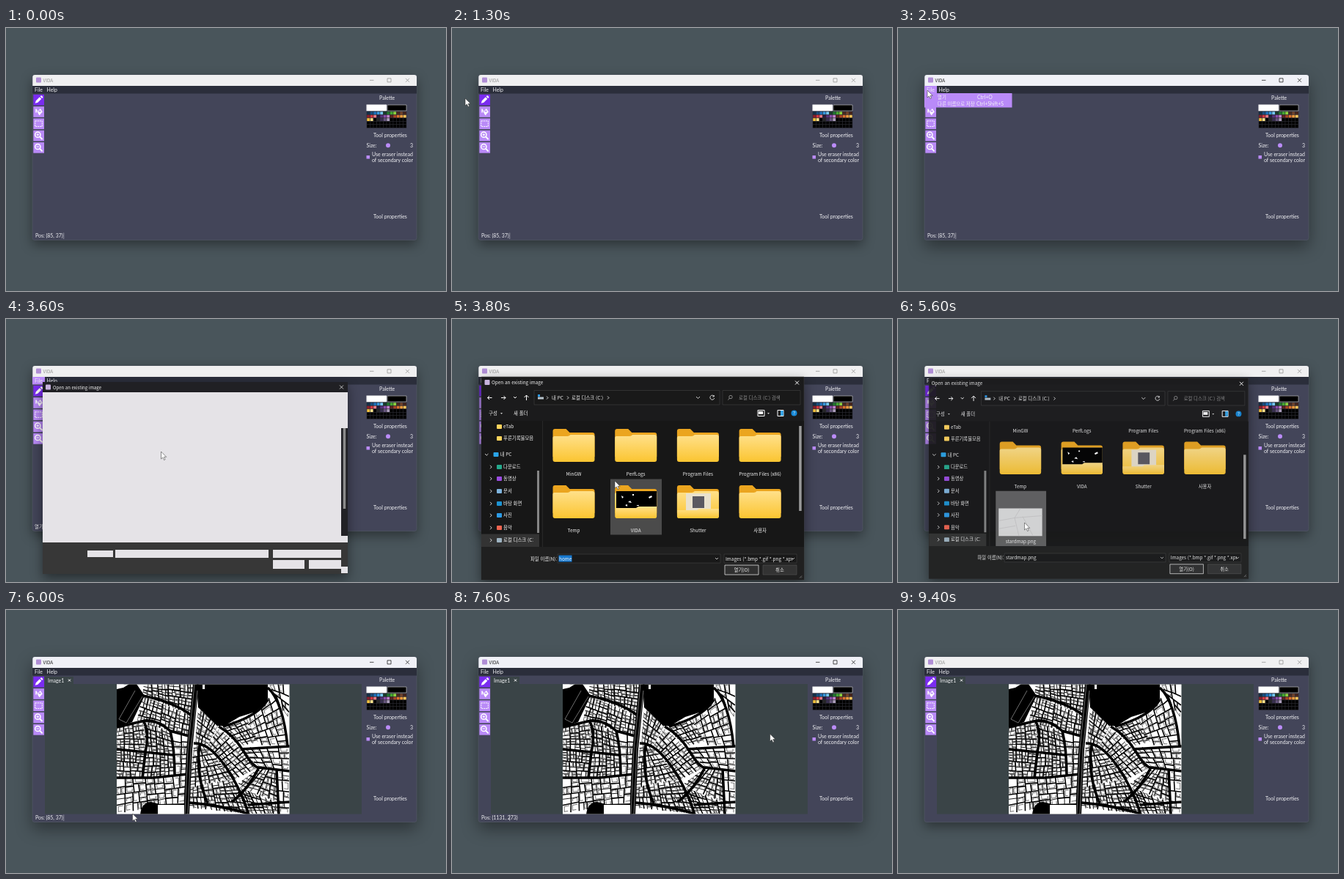
These frames come from a looping animation (600x359 px, 9500 ms). An HTML page:

```html
<!DOCTYPE html>
<html lang="ko">
<head>
<meta charset="utf-8">
<title>Opening an image</title>
<style>
html, body { margin: 0; width: 100%; height: 100%; overflow: hidden; background: #49555b; }
svg { display: block; width: 100%; height: 100%; }
text { white-space: pre; }
.app { font: 6.95px Lato, sans-serif; fill: #f2f2f5; }
.ui { font: 6.4px "Noto Sans CJK KR", "Noto Sans CJK JP", "Noto Sans CJK", sans-serif; fill: #f4f4f4; }
.mid { text-anchor: middle; }
.end { text-anchor: end; }
.line { fill: none; stroke: #fff; }
.dim { fill: none; stroke: #888; }
.frame { fill: #191919; stroke: #424242; stroke-width: .6; }
#dialog, #blank { transform-origin: 259px 217px; }
#dialog, #blank { filter: drop-shadow(0 6px 8px #0007); }
</style>
</head>
<body>
<svg viewBox="0 0 600 359">
  <defs>
    <linearGradient id="gold" x2="0" y2="1"><stop stop-color="#ffe08a"/><stop offset="1" stop-color="#fbc531"/></linearGradient>
    <clipPath id="mapClip"><path d="M151 101.5H386.5V278.5H151z"/></clipPath>
    <clipPath id="listClip"><path d="M124 139H472V311H124z"/></clipPath>
    <clipPath id="sideClip"><path d="M40 139H115V311H40z"/></clipPath>
    <g id="folder">
      <path d="M0 4q0-3 3-3h15l5 5h31q3 0 3 3v30H0z" fill="#eba51f"/>
      <path d="M0 13q0-2 2-2h18q2 0 4-2h30q3 0 3 3v31q0 3-3 3H3q-3 0-3-3z" fill="url(#gold)"/>
    </g>
  </defs>

  <rect width="600" height="359" fill="#49555b"/>
  <rect id="shadow" x="36" y="64" width="524" height="225.5" rx="3" fill="#434559" stroke="#565b68" stroke-width=".6"/>
  <g id="appWindow">
    <path id="titleBar" d="M36.300 79V67q0-3 3-3H557q3 0 3 3V79z"/>
    <g id="titleMarks">
      <rect x="41" y="67.5" width="7" height="7" rx="1" fill="#b08ed6"/>
      <text class="ui" x="50.5" y="73.5" style="fill:inherit">VIDA</text>
      <path d="M496 71.3h5.5M520 68.8h5v5h-5zM545 68.8l5 5m0-5l-5 5" fill="none" stroke="currentColor" stroke-width=".8"/>
    </g>
    <path d="M36 79H560V89.5H36z" fill="#2b2e3b"/>
    <rect id="fileHot" x="36" y="79" width="17" height="10.5" fill="#bb8cfa"/>
    <g class="app"><text x="39" y="87">File</text><text x="55.5" y="87">Help</text></g>
    <g id="tools"></g>

    <g class="app">
      <text class="mid" x="519.7" y="97.7">Palette</text>
      <text class="mid" x="524" y="149">Tool properties</text>
      <text x="491.5" y="162.7">Size:</text><text x="551" y="162.7">3</text>
      <text x="499" y="174.7">Use eraser instead</text>
      <text x="499" y="183">of secondary color</text>
      <text class="mid" x="524" y="260">Tool properties</text>
    </g>
    <g id="palette"></g>
    <circle cx="521" cy="160.3" r="3" fill="#bb8cfa"/>
    <rect x="491.5" y="174" width="4.5" height="4.5" fill="#bb8cfa"/>

    <g id="document">
      <path d="M53 91H92V101H485V278.5H53z" fill="#3a4447"/>
      <text class="app" x="57" y="99.2">Image1</text>
      <path d="M85 94.5l3 3m0-3l-3 3" class="line"/>
      <g id="map" clip-path="url(#mapClip)"></g>
    </g>
    <g class="app">
      <g id="pos"><text id="posText" x="40" y="286.2"></text><path d="M78.7 279.5v8.5" stroke="#c8c8d2" stroke-width=".6"/></g>
      <text id="hint" class="ui" x="39" y="286">열기</text>
    </g>
    <g id="menu">
      <path d="M36 89H155.5V108.5H36z" fill="#b98af8"/>
      <g class="ui"><text x="54" y="96.7">열기</text><text x="54" y="106.3">다른 이름으로 저장</text></g>
      <g class="app"><text x="108" y="96.8">Ctrl+O</text><text x="107" y="106.4">Ctrl+Shift+S</text></g>
    </g>
  </g>

  <g id="blank">
    <path d="M50 86H466V348H50z" fill="#373737"/>
    <path d="M50 86H466V100H50z" fill="#202024"/>
    <rect x="54" y="89.5" width="7" height="7" rx="1" fill="#c7b2dd"/>
    <text class="ui" x="64" y="95.5" style="font-size:6px">Open an existing image</text>
    <path d="M455 90.5l5 5m0-5l-5 5" class="line" stroke-width=".7"/>
    <path d="M50 100H466V149H457V296H466V305H50zM111 316h35v9h-35zM149 315h209v11H149zM364 315h93v11h-93zM364 329h43v12h-43zM413 329h44v9h9v9h-9v-6h-44z" fill="#e5e3e7"/>
    <path d="M457 149h9v147h-9z" fill="#222226"/><path d="M459.7 149h3.5v110h-3.5z" fill="#8b8b8b"/>
  </g>

  <g id="dialog">
    <path d="M40 79H480V356H40z" fill="#1b1b1c" stroke="#3a3a3c" stroke-width=".6"/>
    <path d="M40 139H480V311H40z" fill="#171717"/>
    <path d="M40 311H480V356H40z" fill="#202020"/>
    <rect id="dialogIcon" x="44.5" y="83" width="7" height="7" rx="1" fill="#c7b2dd"/>
    <text id="dialogTitle" class="ui" y="89.2">Open an existing image</text>
    <path d="M468 84.5l5 5m0-5l-5 5M54.5 107.5h-6m2.5-2.5l-2.5 2.5 2.5 2.5M101.5 111v-7m-3 3l3-3 3 3" class="line"/>
    <path d="M67 107.5h6m-2.5-2.5l2.5 2.5-2.5 2.5M84 106l2 2 2-2" class="line"/>
    <path class="frame" d="M112 97.5H365V117H112zM369 97.5H475V117H369z"/>
    <path d="M117 106.5h8v3h-8z" fill="#b8c4cc"/><path d="M117 103h3v3h-3z" fill="#2997e8"/>
    <path d="M129 105.5l2 2-2 2M157 105.5l2 2-2 2M212 105.5l2 2-2 2M333 106l2.5 2.5 2.5-2.5M357 105a3 3 0 1 0 .8 3m-.5-4v2h-2" class="line" stroke-width=".8"/>
    <circle cx="380" cy="106.5" r="2.2" class="dim"/><path d="M378.5 108l-2 2.5" class="dim"/>
    <g class="ui">
      <text x="136" y="109.7">내 PC</text><text x="163" y="109.7">로컬 디스크 (C:)</text>
      <text x="391" y="109.7" style="fill:#8f8f8f">로컬 디스크 (C:) 검색</text>
      <text x="50" y="131.3">구성</text><text x="84" y="131.3">새 폴더</text>
      <text class="end" x="143" y="329.5">파일 이름(N):</text>
    </g>
    <path d="M66 128h3l-1.5 2zM430 128h3l-1.5 2z" fill="#ccc"/>
    <path d="M417 124.5h9v8h-9zM444 124.5h8v8h-8z" class="line"/><path d="M418 126h6v4h-6z" fill="#fff"/><path d="M448 125h4v7h-4z" fill="#38a5e8"/>
    <circle cx="466.5" cy="128.5" r="4" fill="#1689d8"/><text class="ui mid" x="466.5" y="130.7">?</text>
    <path d="M40 293.5H119V311H40z" fill="#333"/>
    <g id="side" class="ui" clip-path="url(#sideClip)"></g>
    <path d="M116 207h3v85h-3z" fill="#858585"/><path d="M123.5 139V311" stroke="#303030" stroke-width=".7"/>
    <g clip-path="url(#listClip)"><g id="files" class="ui">
      <path id="hover" d="M216 218.5h70v76h-70z" fill="#4b4b4b"/>
      <path id="selected" d="M132 295h69.5v76H132z" fill="#626262"/>
    </g></g>
    <path id="thumb" d="M473.2 146h3.5v116h-3.5z" fill="#9a9a9a"/>
    <path class="frame" d="M144 321H366V333H144zM371 321H470V333H371z"/>
    <path id="marked" d="M145.5 322.5h18v9h-18z" fill="#1879cf"/>
    <text id="fileName" class="ui" x="146" y="329.5"></text>
    <text class="ui" x="373" y="329.5">Images (*.bmp *.gif *.png *.xpı</text>
    <path d="M359 326l2 2 2-2M463 326l2 2 2-2" class="line" stroke-width=".7"/>
    <path d="M372 336h46v13h-46z" fill="#303030" stroke="#ddd" stroke-width=".8"/><path d="M424 336h46v13h-46z" fill="#333" stroke="#555" stroke-width=".6"/>
    <g class="ui mid"><text x="395" y="344.8">열기(O)</text><text x="447" y="344.8">취소</text></g>
    <path d="M474 353.5l3-3m-1 3l1-1" class="dim" stroke-width=".8"/>
  </g>

  <path id="cursor" d="M0 0V10l2.3-2.1L4 11.5l1.6-.8L4 7.3h3.2z" fill="#fff" stroke="#222" stroke-width=".5"/>
</svg>
<script>
const LOOP = 9500, STEP = 100;
const $ = id => document.getElementById(id);
const add = (id, markup) => $(id).insertAdjacentHTML('beforeend', markup);

function drawTools() {
  const lens = '<circle cx="6" cy="6" r="3.6" class="line" stroke-width="1.5"/><path d="M8.7 8.7l3.6 3.6" class="line" stroke-width="1.8"/>';
  const icons = [
    '<path d="M2.5 12l1-3.5 5-5 2.500 2.500-5 5zM9.300 2.800l1-1q.7-.5 1.300 0l1.200 1.200q.5.600 0 1.300l-1 1z" fill="#fff"/>',
    '<path d="M3 3.500h1.500v5H3zM5.500 7.500l4-4.500 3 4.500-4.500 4.500z" fill="#fff"/><path d="M6.500 7.500l2.500-2.700 1.800 2.700z" fill="#b98af7"/><path d="M4 4l5 8" class="line"/>',
    '<path d="M2.500 3.500h9.500v7.500H2.500z" class="line" stroke-dasharray="2 1"/>',
    lens + '<path d="M4.300 6h3.400M6 4.300v3.400" class="line"/>',
    lens + '<path d="M4.300 6h3.400" class="line"/>'
  ];
  icons.forEach((icon, i) => add('tools', `<g transform="translate(37.3 ${90.8 + i * 16.3})">
    <rect width="14.7" height="14.7" fill="${i ? '#b98af7' : '#7a2cf0'}"/>${icon}</g>`));
}

function drawPalette() {
  const rows = [
    '#12304a #174f80 #1d6fb8 #3596dc #74c6f0 #173d2b #20762f #43a832 #8bd13e #4a2a20 #70432c #45251d',
    '#8b1c2c #d5353f #ed7b86 #281b3c #56307b #8a4bab #c080cc #5c2420 #a74424 #de722d #f29a3c #ffc55c',
    '#f2bf3c #ffe28a #000 #262626 #393050 #66557e #ab9dbb'
  ];
  let cells = '';
  for (let r = 0; r < 5; r++) for (let c = 0; c < 12; c++) {
    const fill = (rows[r] || '').split(' ')[c] || '#000';
    cells += `<rect x="${492 + c * 4.5}" y="${114 + r * 4.45}" width="4.5" height="4.45" fill="${fill}"/>`;
  }
  add('palette', `<path d="M491.5 104.5h27.5v8.8h-27.5z" fill="#fff"/>
    <path d="M520 105h26v8h-26z" stroke="#bbb" stroke-width=".7"/>
    <g stroke="#2b2b30" stroke-width=".5">${cells}</g>`);
}

function drawMap() {
  let seed = 41;
  const random = () => (seed = seed * 16807 % 2147483647) / 2147483647;
  const mix = (a, b, k) => [a[0] + (b[0] - a[0]) * k, a[1] + (b[1] - a[1]) * k];
  const gap = (a, b) => Math.hypot(a[0] - b[0], a[1] - b[1]);
  const path = (...points) => 'M' + points.map(p => p.map(v => v.toFixed(1)).join(' ')).join('L');
  let streets = '', fences = '', houses = '';

  // Cuts a district across its longer side, slightly askew, until only building plots remain.
  function split([a, b, c, d], limit) {
    let w = (gap(a, b) + gap(c, d)) / 2, h = (gap(b, c) + gap(a, d)) / 2;
    if (w < h) [a, b, c, d, w, h] = [b, c, d, a, h, w];
    const area = w * h;
    if (area < limit * (.6 + random() * .8)) {
      const inner = (u, v) => mix(mix(a, b, u), mix(d, c, u), v);
      const u = .12 + random() * .15, v = .75 + random() * .12;
      if (random() < .7) houses += path(inner(u, .2), inner(u, v), inner(.8, v), inner(.8, .35));
      return;
    }
    const k = .4 + random() * .2, m = k + (random() - .5) * .12;
    const p = mix(a, b, k), q = mix(d, c, m);
    if (area > 180) streets += path(p, q);
    else fences += path(p, q);
    split([a, p, q, d], limit);
    split([p, b, c, q], limit);
  }
  const districts = (limit, list) => list.split('\n').forEach(row =>
    split(row.trim().split(' ').map(p => p.split(',').map(Number)), limit));

  districts(44, `188,101 257,101 253,144 186,116
    186,117 253,144 252,173 178,152
    151,160 188,152 190,194 151,190
    188,152 224,166 228,198 190,194
    151,190 190,194 186,229 151,229
    190,194 228,198 230,226 186,229`);
  districts(48, `262,133 290,158 274,186 258,181
    290,159 326,147 345,180 318,186
    274,186 290,160 345,215 310,232
    256,184 272,185 310,230 250,243
    250,242 310,230 330,278 250,270
    345,216 370,219 372,263 312,240
    312,240 372,263 372,278 330,278`);
  districts(130, `151,230 247,225 245,262 151,278
    227,168 252,173 247,224 231,226
    326,147 368,112 384,186 342,184
    318,188 386,186 386,219 345,215
    370,219 386,220 386,278 372,278
    358,101 386,101 386,150 370,125`);

  add('map', `<path d="M151 101H387V279H151z" fill="#fff"/>
    <g fill="none" stroke="#000">
      <path d="${houses}" stroke-width=".55"/>
      <path d="${fences}" stroke-width=".9"/>
      <path d="${streets}" stroke-width="1.6"/>
      <path stroke-width="3.6" d="M151 160L185 152Q203 147 224 165L253 173M187 117Q230 126 253 144M151 190L228 198
        M188 152Q196 170 190 194L186 229M224 165Q230 190 230 226M151 229H200L248 224
        M256 182Q274 181 293 205T325 262L331 279M290 159Q310 170 324 193T345 215L387 220
        M296 159Q345 145 357 122M357 106Q378 125 384 187M320 190L387 186M345 215Q330 245 308 262
        M369 218L372 279M330 266L387 262M264 184Q258 225 275 264M249 263Q290 266 331 278"/>
      <path d="M259 101L250 190 246 279" stroke-width="8"/>
    </g>
    <path d="M260 101H357V124L340 139 318 146 298 158H288L262 133zM151 108L160 106 168 101H178L189 117 172 153 151 160z
      M183 279q2-17 15-17l12 3 35-1v15z"/>
    <path d="M207 266h36v13h-36zM268 102h3v6h-3zM151 101h10l-4 5-6 1z" fill="#fff"/>
    <path d="M154 149L176 110M164 154L186 118M154 149L164 154M257 101L248 190 244 279M261 110L252 190 248 279" fill="none" stroke="#ddd" stroke-width=".5"/>`);
}

function drawDialogLists() {
  const places = [
    ['eTab', 147, '#ffd45c'], ['푸른기록물모음', 163, '#ffd45c'], ['내 PC', 185, '#2aa4e8'],
    ['다운로드', 202, '#25a98c'], ['동영상', 218, '#9a4be0'], ['문서', 235, '#7fb4dd'],
    ['바탕 화면', 252, '#1d93d2'], ['사진', 268, '#2d9be6'], ['음악', 285, '#ee6450'], ['로컬 디스크 (C:', 302, '#9fb4c2']
  ];
  places.forEach(([name, y, color], i) => {
    const x = i === 2 ? 60 : 64.5;
    const arrow = i < 2 ? '' : i === 2 ? 'M45 184l2.2 2.2 2.2-2.2' : `M52 ${y - 2.2}l2.2 2.2-2.2 2.2`;
    add('side', `<path d="${arrow}" class="line" stroke-width=".8"/>
      <rect x="${x - 3.5}" y="${y - 3}" width="7" height="6" rx="1" fill="${color}"/>
      <text x="${x + 5.5}" y="${y + 2.3}">${name}</text>`);
  });

  const folders = ['MinGW', 'PerfLogs', 'Program Files', 'Program Files (x86)', 'Temp', 'VIDA', 'Shutter', '사용자'];
  folders.forEach((name, i) => {
    const x = 166 + i % 4 * 84.7, y = 149 + (i > 3) * 77;
    add('files', `<use href="#folder" x="${x - 28.5}" y="${y}"/><text class="mid" x="${x}" y="${y + 65}">${name}</text>`);
  });
  add('files', `<path d="M224 235h55v24h-55z" fill="#000"/>
    <path d="M231 241l3 2-2 2zM268 243l4-2 1 2-4 2zM246 239h2v2h-2zM240 250l3-2 2 3zM252 254h3v1h-3zM236 254l3-1v3z" fill="#fff"/>
    <path d="M223 258h28l3-2h25v13q0 3-3 3h-50q-3 0-3-3z" fill="url(#gold)"/>
    <path d="M319 238h34v25h-34z" fill="#e9e1cd"/><path d="M328 242h16v16h-16z" fill="#5b5961"/>
    <path d="M307 261h27l3-2h27v10q0 3-3 3h-51q-3 0-3-3z" fill="url(#gold)"/>
    <path d="M136 319h60v38h-60z" fill="#dedede"/>
    <path d="M136 336l22-4 8-13m-8 13l6 25m-6-25l38-3m-27 1l14 26m-47-9l23-4" fill="none" stroke="#c8c8c8" stroke-width=".8"/>
    <text class="mid" x="166.5" y="367">stardmap.png</text>`);
}

const visible = {
  fileHot: [[2000, 3700]],
  menu: [[2000, 3200]],
  hint: [[2900, 3700]],
  pos: [[0, 2900], [5700, 7000], [7300, 7700]],
  document: [[5800, LOOP]],
  blank: [[3500, 3700]],
  dialog: [[3700, 5800]],
  dialogIcon: [[0, 5600]],
  hover: [[3800, 4300]],
  selected: [[5000, LOOP]],
  marked: [[0, 5000]],
  cursor: [[400, 9400]]
};
const active = [[2000, 3300], [5700, 9400]];
const cursorPath = [
  [400, 584, 56], [900, 300, 100], [1300, 18, 96], [1700, 40, 85], [2500, 40, 85], [2900, 62, 94], [3200, 62, 94],
  [3600, 211.5, 181], [3800, 222, 221], [4300, 222, 225], [4700, 205, 245], [5000, 172.5, 278],
  [7200, 172.5, 278], [7700, 499, 142]
];
const within = (spans, t) => spans.some(([from, to]) => t >= from && t < to);

// Linear value along [time, ...values] stops.
function along(stops, t, i = 1) {
  const next = stops.findIndex(s => s[0] > t);
  if (next < 0) return stops[stops.length - 1][i];
  if (!next) return stops[0][i];
  const a = stops[next - 1], b = stops[next];
  return a[i] + (b[i] - a[i]) * (t - a[0]) / (b[0] - a[0]);
}

function pose(id, scale, opacity) {
  $(id).style.transform = `scale(${scale})`;
  $(id).style.opacity = opacity;
}

function render(t) {
  for (const id in visible) $(id).style.display = within(visible[id], t) ? '' : 'none';
  const focus = within(active, t);
  const marks = $('titleMarks').style;
  marks.color = marks.fill = focus ? '#222' : '#959595';
  $('titleBar').style.fill = focus ? '#f0f1f7' : '#f0f0f1';
  $('shadow').style.filter = `drop-shadow(0 ${focus ? 9 : 6}px ${focus ? 11 : 8}px #0006)`;

  const x = along(cursorPath, t), y = along(cursorPath, t, 2);
  $('cursor').setAttribute('transform', `translate(${x} ${y})`);
  $('posText').textContent = t >= 7300 && t < 7700
    ? `Pos: (${Math.round((x - 151) * 4)}, ${Math.round((y - 101) * 4)})` : 'Pos: (85, 37)';

  const scroll = along([[4300, 0], [4700, 60]], t);
  $('files').setAttribute('transform', `translate(0 ${-scroll})`);
  $('thumb').setAttribute('transform', `translate(0 ${scroll * .65})`);
  $('fileName').textContent = t < 5000 ? 'home' : 'stardmap.png';
  $('dialogTitle').setAttribute('x', t < 5600 ? 54 : 43.5);
  pose('blank', t < 3600 ? .95 : 1, t < 3600 ? .6 : 1);
  pose('dialog', along([[5500, 1], [5600, .99], [5700, .95]], t), along([[5500, 1], [5600, .92], [5700, .3]], t));
}

function tick() {
  render(Math.floor(performance.now() % LOOP / STEP) * STEP);
  requestAnimationFrame(tick);
}

drawTools();
drawPalette();
drawMap();
drawDialogLists();
tick();
</script>
</body>
</html>
```
